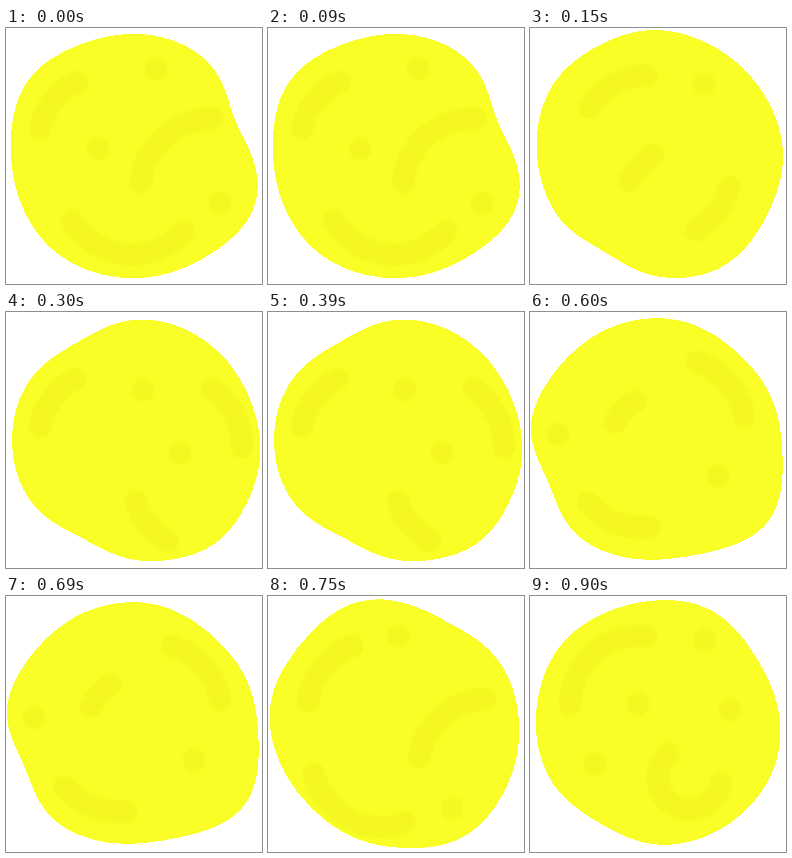
Write an HTML page that moves like this. It is 256 px wide and 256 px high and loops after 1050 ms.

```html
<!DOCTYPE html>
<html lang="en">
<head>
<meta charset="utf-8">
<title>Wobbling yellow ball</title>
<style>
  html, body { margin: 0; width: 100%; height: 100%; overflow: hidden; background: #fff; }
  svg { display: block; width: 1792px; height: 256px; animation: flip 1050ms steps(7) infinite; }
  .ball { fill: #f9ff26; shape-rendering: crispEdges; }
  .marks { fill: none; stroke: #f4f820; stroke-width: 23; stroke-linecap: round; filter: blur(1.2px); }
  @keyframes flip { to { transform: translateX(-1792px); } }
</style>
</head>
<body>
<svg id="strip" viewBox="0 0 1792 256"></svg>
<script>
const SIZE = 256, CENTRE = 128, RADIUS = 122, BUMP_WIDTH = 24, MARK_RADIUS = 70;

// A round ball with soft bumps and dents; angles run clockwise from the right.
function outline(bumps) {
  const points = [];
  for (let angle = 0; angle < 360; angle += 3) {
    const r = bumps.reduce((sum, [at, height]) => {
      const gap = (angle - at + 540) % 360 - 180;
      return sum + height * Math.exp(-((gap / BUMP_WIDTH) ** 2));
    }, RADIUS);
    const a = angle * Math.PI / 180;
    points.push(`${CENTRE + r * Math.cos(a)} ${CENTRE + r * Math.sin(a)}`);
  }
  return `M${points.join('L')}Z`;
}

// Clockwise arc between two points; a tighter radius makes it a hook.
const arc = (x1, y1, x2, y2, r = MARK_RADIUS) =>
  `M${x1} ${y1}A${r} ${r} 0 ${+(r < MARK_RADIUS)} 1 ${x2} ${y2}`;

const dot = (x, y) => `M${x} ${y}h.01`;

const pose = (bumps, ...marks) => ({ bumps, marks: marks.join('') });

const poses = [
  pose([[24, 9], [130, 2], [215, 8], [340, -15]],
    arc(34, 100, 71, 54), arc(135, 155, 207, 91), arc(178, 203, 66, 193),
    dot(150, 41), dot(92, 121), dot(214, 175)),
  pose([[0, 3], [58, 6], [120, -12], [160, -3], [217, 5], [265, 4]],
    arc(60, 79, 117, 47), arc(100, 153, 123, 127), arc(199, 159, 166, 202),
    dot(174, 56)),
  pose([[12, 5], [50, 9], [118, -11], [240, -9]],
    arc(34, 114, 69, 67), arc(206, 77, 236, 135), arc(162, 229, 130, 190),
    dot(137, 78), dot(174, 141)),
  pose([[22, 6], [65, -6], [102, 5], [225, 8], [295, 6], [328, -9]],
    arc(53, 57, 127, 36), arc(113, 146, 166, 102), arc(226, 135, 187, 199), arc(112, 234, 48, 180),
    dot(180, 55), dot(48, 108)),
  pose([[36, 15], [80, -3], [139, 6], [159, -11], [182, 9], [312, -4]],
    arc(167, 50, 214, 104), arc(85, 110, 105, 89), arc(120, 215, 58, 191),
    dot(28, 122), dot(188, 164)),
  pose([[25, 3], [58, 9], [135, -3], [190, 5], [250, 6], [298, -8]],
    arc(40, 105, 84, 50), arc(151, 161, 217, 103), arc(137, 227, 46, 178),
    dot(131, 40), dot(184, 212)),
  pose([[22, 2], [120, -7], [220, 3], [292, 4], [328, -4]],
    arc(40, 108, 116, 40), arc(191, 188, 139, 157, 32),
    dot(175, 44), dot(108, 108), dot(200, 114), dot(65, 168))
];

document.getElementById('strip').innerHTML = poses.map(({ bumps, marks }, i) =>
  `<g transform="translate(${i * SIZE})">
    <path class="ball" d="${outline(bumps)}"/>
    <path class="marks" d="${marks}"/>
  </g>`).join('');
</script>
</body>
</html>
```
